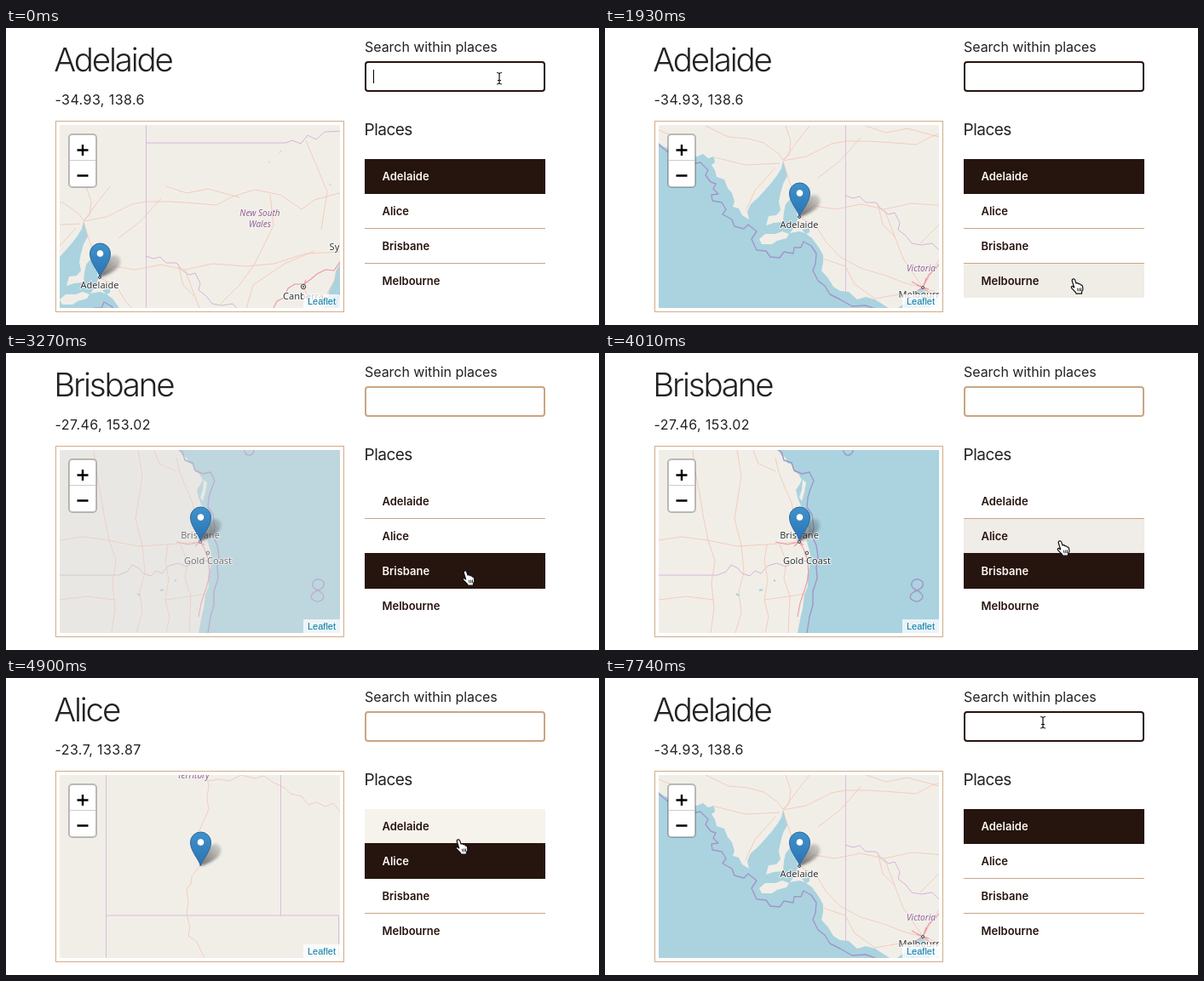
Recreate the animation shown at these times as an HTML page. Size 696 by 349 pixels, loop 8000 ms.

```html
<!DOCTYPE html>
<html lang="en">
<head>
<meta charset="utf-8">
<title>Places</title>
<style>
  html, body { margin: 0; width: 100%; height: 100%; overflow: hidden; background: #fff; }
  svg { display: block; width: 696px; height: 349px; }
  text { font-family: Inter, "Open Sans", sans-serif; fill: #222; }
  path, line { fill: none; }
  .title { font-size: 38.5px; font-weight: 300; letter-spacing: -2.2px; }
  .body { font-size: 16px; letter-spacing: -.05px; }
  .coords { font-size: 16px; letter-spacing: .42px; }
  .sub { font-size: 19px; letter-spacing: -.5px; }
  .row { font-size: 13px; font-weight: 600; }
  .sea { fill: #aad3df; }
  .land { fill: #f1eee8; }
  .road { stroke: #f4c4b2; stroke-width: .9; stroke-linejoin: round; opacity: .9; }
  .main { stroke: #ec97a5; stroke-width: 1.1; stroke-linejoin: round; }
  .edge { stroke: #c9a3cf; stroke-width: 1; opacity: .75; stroke-linejoin: round; }
  .faint { stroke: #d9bedb; stroke-width: 1; }
  .coast { stroke: #a295c8; stroke-width: 1.4; stroke-linejoin: round; }
  .town { font: 11px "Noto Sans", sans-serif; fill: #333; text-anchor: middle;
          stroke: #fff; stroke-opacity: .8; stroke-width: 2; paint-order: stroke; stroke-linejoin: round; }
  .state { font: italic 10px "Noto Sans", sans-serif; fill: #8c5f94; text-anchor: middle;
           stroke: #f7f3f0; stroke-width: 1.5; paint-order: stroke; }
  .dot { fill: #eee; stroke: #444; stroke-width: 1; }
  .link { font: 11px "Liberation Sans", Arial, sans-serif; fill: #0078a8; }
</style>
</head>
<body>
<svg viewBox="0 0 696 349">
  <defs>
    <clipPath id="view"><rect x="63" y="114" width="329" height="215"/></clipPath>
    <linearGradient id="blue" x1="0" y1="0" x2="0" y2="1">
      <stop offset="0" stop-color="#3f93cc"/><stop offset="1" stop-color="#2a72b4"/>
    </linearGradient>
    <linearGradient id="shade" x1="0" y1="1" x2="1" y2="0">
      <stop offset="0" stop-color="#222" stop-opacity=".65"/><stop offset="1" stop-color="#444" stop-opacity=".15"/>
    </linearGradient>
    <filter id="soft" x="-30%" y="-30%" width="160%" height="160%"><feGaussianBlur stdDeviation="1.5"/></filter>
  </defs>
  <rect width="696" height="349" fill="#fff"/>
  <text id="title" class="title" x="56.3" y="51"></text>
  <text id="coords" class="coords" x="57.5" y="90"></text>

  <rect x="58.5" y="109.5" width="338" height="224" fill="#fff" stroke="#cfac88"/>
  <g clip-path="url(#view)">
    <rect x="63" y="114" width="329" height="215" fill="#ddd"/>

    <g id="south">
      <rect class="land" x="0" y="0" width="720" height="480"/>
      <path class="sea" d="M40 126L62 133 70 139 82 142 92 140 99 148 108 150 115 147 121 152 128 150 129 157 125 160 129 166
        131 174 140 177 144 187 149 193 152 203 150 209 157 211 161 219 169 224 167 215 171 206 180 198 189 188 196 180 202 172 207 164 209 155
        211 162 214 173 209 182 206 193 204 203 206 213 201 219 192 220 189 231 198 228 209 227 210 215 212 206 217 200 221 205 225 213 226 224 222 233 217 240
        228 238 235 240 243 246 251 257 256 266 256 275 254 284 262 293 268 303 276 308 286 309 296 318 306 315 317 318 339 332 V480H40Z"/>
      <path class="sea" d="M339 332L353 321 364 316 369 322 378 323 384 330 392 327 399 332 405 340 410 337 408 329 418 321 430 310 442 304
        458 301 472 297 487 293 485 281 489 270 490 258 496 248 497 237 503 226 505 214 510 204 515 195 521 180 530 164 545 150 550 110 560 80H720V480H339Z"/>
      <path class="sea" d="M360 312L366 308 372 304 377 310 375 317 370 320 365 316Z"/>
      <path class="land" d="M181 247L188 241 200 241 208 238 216 241 213 246 202 249 196 253 184 253Z M348 355L354 358 354 368 350 373 346 366Z
        M437 357L444 362 449 370 446 376 440 370Z M448 379L454 381 451 385 445 383Z"/>
      <path class="land" d="M362 394L366 385 370 389 380 393 392 390 408 396 418 391 426 392 436 384 444 386 451 382 458 394 460 480H372Z"/>
      <path class="sea" d="M231 236L240 234 240 239 236 241Z"/>
      <path class="faint" d="M282.5 0V310"/>
      <path class="edge" d="M282 63H446L454 60 464 64 472 54 482 59 492 50 512 49"/>
      <path class="edge" d="M282 196L291 199 299 197 306 204 318 204 325 213 333 218 340 216 346 228 344 236 353 243 360 252 371 254
        384 252 394 262 408 258 421 262 432 261 438 270 447 271 487 294"/>
      <path class="road" d="M63 119L80 126 100 134 M118 114L145 127 168 129 186 134 203 146 209 154 216 148 218 132 212 114 M209 155L236 150 248 144 266 135
        282 132 310 132 340 134 365 136 384 126 410 118 440 124 465 141 480 130 520 119 M165 214L176 190 200 163 M129 151L165 160 205 158"/>
      <path class="road" d="M228 221L224 200 216 178 209 156 M228 221L245 208 270 212 300 206 328 212 360 205 400 208 432 205 470 193 516 191
        M228 221L248 232 259 250 276 268 300 281 330 290 350 298 373 304 M256 270L282 279 293 300 317 317 345 312"/>
      <path class="road" d="M250 175L276 155 300 128 M328 212L340 244 350 270 373 304 M370 252L392 230 410 205 432 160 428 124
        M306 114L330 122 355 117 392 127 M240 114L226 132 210 154"/>
      <path class="road" d="M373 304L390 275 400 258 M373 304L400 314 430 308 460 299 485 282 490 250 503 225 516 191 M467 232L478 255 486 280
        M320 205L326 230 340 244 M400 258L408 230 445 205 480 190 M470 60L495 120 488 165"/>
      <path class="main" d="M373 304L380 289 387 283 396 272 409 268 418 264 431 259 436 249 444 245 449 234 457 229 468 229 476 223 483 217 493 212 503 213 516 194
        M467 232L470 224 M373 304L361 311 M373 304L383 312 400 315 M373 304L360 297 M373 304L377 293 M366 301L380 306"/>
      <path class="coast" d="M40 118L64 137 74 145 85 148 100 159 112 157 121 166 118 172 124 180 130 182 127 188 133 194 125 195 126 202 137 204 142 212
        138 218 149 224 152 232 163 235 168 230 178 238 172 247 178 260 189 261 194 268 205 269 210 262 221 264 222 257 230 257 233 250 242 255 248 264
        247 276 244 284 250 296 258 302 264 312 276 318 290 326 306 325 317 329 332 341 350 335 361 328 375 335 379 329 387 332 391 341 407 348 424 324 445 314"/>
      <path class="coast" d="M445 314L470 309 490 305 502 290 497 282 504 264 507 245 517 230 520 214 530 198 545 186
        M345 350Q354 347 361 352L366 371Q361 382 352 384L348 371 341 362Z M367 397L364 382 378 376 384 383 400 386 412 382 420 371
        416 358 426 344 437 342 447 350 461 367 463 382 457 392 464 403"/>
      <circle class="dot" cx="228" cy="221" r="1.5"/><circle class="dot" cx="373" cy="304" r="1.5"/>
      <circle class="dot" cx="467" cy="232" r="2.7"/><circle cx="467" cy="232" r="1" fill="#444"/>
      <path d="M439 75l2-3M426 86l2-1M497 111l3 2" stroke="#b9cfe0"/>
      <text class="state" x="416" y="149">New South</text><text class="state" x="416" y="162">Wales</text>
      <text class="state" x="371" y="285">Victoria</text>
      <text class="town" x="228" y="234">Adelaide</text>
      <text class="town" x="373" y="316">Melbourne</text>
      <text class="town" x="467" y="247">Canberra</text>
      <text class="town" x="516" y="189">Sydney</text>
      <rect id="strip" x="0" y="397" width="720" height="90" fill="#d8dadb"/>
    </g>

    <g id="east">
      <rect class="sea" x="63" y="114" width="329" height="215"/>
      <path class="land" d="M63 114H203L207 120 212 123 214 129 219 131 222 139 227 142 231 149 228 155 224 161 226 170 230 180 231 190 229 197 235 207 237 222 241 236 240 252
        237 262 238 274 234 284 232 300 229 313 226 329H63Z M232 149L236 152 234 164 231 174 228 170 231 160Z M236 202L239 206 238 215 235 209Z"/>
      <path class="edge" d="M63 261H132L142 257 148 249 156 253 161 259 170 262 176 256 183 259 191 250 202 247 212 251 222 246 240 244"/>
      <path class="road" d="M103 114L106 140 111 165 115 190 121 220 129 244 125 270 128 300 124 329 M63 220L90 216 120 220 155 227 190 225 228 222
        M155 114L160 145 156 170 152 195 160 226 M200 123L204 140 211 158 219 176 223 196 228 222 M174 114L180 130 200 139"/>
      <path class="road" d="M190 225L187 245 191 266 187 290 192 310 188 329 M160 226L163 258 157 280 160 305 153 329 M187 290L236 283
        M205 225L213 246 210 265 217 285 215 329 M63 290L95 286 128 290"/>
      <path class="main" d="M228 222L214 225 200 222 M228 206V222L233 230 238 244 239 262 235 276 229 294 226 310 M222 216L233 226M222 227L232 218"/>
      <path class="coast" d="M196 110L207 116 210 126 219 129 222 138 231 142 240 140 245 150 241 160 238 170 237 181 243 190 245 205 243 215 248 226 250 240
        248 251 249 265 244 280 244 296 240 310 237 329 M279 110Q280 121 286 120 Q292 119 291 110 M366 279Q357 275 361 268 Q367 263 373 269
        Q375 276 366 279 Q356 283 359 289 Q366 295 372 289 Q375 283 366 279Z"/>
      <path d="M181 279l4-1M154 283l3 2M198 267l2 1" stroke="#a4cfdf" stroke-width="2"/>
      <circle class="dot" cx="228" cy="222" r="1.5"/><circle class="dot" cx="237" cy="235" r="1.8"/>
      <text class="town" x="228" y="218">Brisbane</text>
      <text class="town" x="237" y="248">Gold Coast</text>
    </g>

    <g id="centre">
      <rect class="land" x="63" y="114" width="329" height="215"/>
      <path class="faint" d="M117.5 114V329M322.5 114V279M117 279H390.5V329"/>
      <path class="road" d="M235 114L238 126 236 142 238 154 233 166 228 177 221 188 226 204 228 220 218 233 217 242 212 248 214 264 212 278 216 293
        214 303 224 310 228 319 233 329 M237 121L250 119 262 121 276 114 292 118 303 115 314 123 327 129 334 136 347 139 355 149 365 146 375 151 384 147 392 157"/>
      <text class="state" x="220" y="118">Territory</text>
    </g>

    <g id="pin">
      <path d="M0 0Q3-18 13-25Q23-29 24-18Q22-7 0 0Z" style="fill:url(#shade)" filter="url(#soft)"/>
      <path d="M0 0C-2-8-12-17-12-28A12 12 0 0 1 12-28C12-17 2-8 0 0Z" style="fill:url(#blue)" stroke="#2d699b"/>
      <circle cy="-28" r="4.3" fill="#fff" stroke="#3277ae" stroke-width=".8"/>
    </g>

    <rect x="74" y="125" width="32" height="62" rx="4" fill="#fff" stroke="#000" stroke-opacity=".25" stroke-width="2"/>
    <path d="M75 155.5H105" stroke="#ccc"/>
    <path d="M83.5 143.5H96.5M90 137V150M83.5 173.5H96.5" stroke="#000" stroke-width="2.4"/>
    <rect x="349" y="313" width="43" height="16" fill="#fff" fill-opacity=".75"/>
    <text class="link" x="354" y="325">Leaflet</text>
  </g>

  <text class="body" x="421" y="28">Search within places</text>
  <rect id="box" x="422" y="40" width="210" height="34" rx="3" fill="#fff" stroke-width="2"/>
  <rect id="caret" x="431" y="49" width="1" height="16" fill="#000"/>
  <text class="sub" x="420.5" y="126">Places</text>
  <g id="list"></g>

  <g id="cursor" stroke-linejoin="round">
    <path id="beam" d="M-3-6.5Q-.3-6.5 0-5Q.3-6.5 3-6.5M0-5V5.5M-3 7Q-.3 7 0 5.5Q.3 7 3 7M-2 2.5H2" stroke="#111" stroke-width="1.2"/>
    <path id="arrow" d="M-4-8V5.5L-1 2.8 1 7.5 3.2 6.5 1.2 2H5.2Z" style="fill:#000" stroke="#fff"/>
    <g id="hand" transform="scale(1.1)">
      <path d="M-4.6-7.2Q-2.6-8-2-6L-.9-2.7Q.8-3.5 1.6-2Q3.2-2.6 3.8-1Q5.6-1.2 5.9.6L6.3 3.6 5 6.6V8.3H-.8L-1.5 6.8-5.6 2.6Q-6.7.9-5 .4L-3 1.7-5.3-5.4Q-5.5-6.8-4.6-7.2Z"
        style="fill:#fff" stroke="#111" stroke-width="1.1"/>
      <path d="M.3 2.5L1 5.8M2.3 2.3L2.7 5.8M4.1 2.2V5.6" stroke="#111" stroke-width=".8"/>
    </g>
  </g>
</svg>
<script>
  const LOOP = 8000, DARK = '#26140e', TAN = '#c9a583';
  const $ = id => document.getElementById(id);
  const set = (el, attrs) => { for (const k in attrs) el.setAttribute(k, attrs[k]); };
  const show = (el, on) => set(el, { visibility: on ? 'visible' : 'hidden' });
  const make = (tag, attrs, parent) => {
    const el = document.createElementNS('http://www.w3.org/2000/svg', tag);
    set(el, attrs);
    return parent.appendChild(el);
  };
  // Latest entry of a [time, ...values] track
  const at = (track, t) => track.filter(e => e[0] <= t).pop().slice(1);

  const places = [
    { name: 'Adelaide', coords: '-34.93, 138.6', map: 'south', x: 0, y: 0 },
    { name: 'Alice', coords: '-23.7, 133.87', map: 'centre', x: 0, y: 0 },
    { name: 'Brisbane', coords: '-27.46, 153.02', map: 'east', x: 0, y: 0 },
    { name: 'Melbourne', coords: '-37.81, 144.96', map: 'south', x: -145, y: -83 }
  ];
  const chosen = [[0, 0], [2080, 3], [3270, 2], [4310, 1], [5650, 0]];
  // A panned map settles one pixel lower than a freshly loaded one
  const pan = [[0, -118, 72], [150, 0, 1], [2080, 72, 41], [2230, 0, 1], [3270, 0, 0]];
  const fade = [[0, 1], [3270, .6], [3420, 1], [4310, .6], [4460, 1], [5650, .6], [5800, 1]];
  const focus = [[0, 1], [2080, 0], [7290, 1]];
  const blink = [[0, 1], [450, 0], [1040, 1], [1640, 0], [7290, 1], [7740, 0]];
  const hover = [[0, -1], [1790, 2, '#f0ede6'], [1930, 3, '#f0ede6'], [2080, -1],
    [3860, 1, '#f6f3ec'], [4010, 1, '#f0ece7'], [4310, -1], [4900, 0, '#f6f3ec'], [5650, -1]];
  const pointer = [
    [0, 579, 59, 'beam'], [1340, 577, 70, 'beam'], [1490, 573, 108, 'arrow'], [1640, 566, 180, 'hand'],
    [1790, 558, 258, 'hand'], [1930, 554, 303, 'hand'],
    [2530, 553, 300, 'hand'], [2680, 551, 293, 'hand'], [2820, 548, 286, 'hand'], [3270, 543, 264, 'hand'],
    [3710, 542, 257, 'hand'], [3860, 540, 241, 'hand'], [4010, 538, 229, 'hand'],
    [4750, 537, 214, 'hand'], [4900, 535, 198, 'hand'], [5650, 536, 198, 'hand'],
    [6400, 535, 185, 'hand'], [6550, 531, 150, 'arrow'], [6700, 526, 112, 'arrow'],
    [6840, 519, 72, 'beam'], [6990, 514, 52, 'beam']
  ];

  const list = $('list');
  const rowTop = i => 153 + 41 * i;
  const glow = make('rect', { x: 421, width: 212, height: 40 }, list);
  for (let i = 1; i < 4; i++) make('rect', { x: 421, y: rowTop(i), width: 212, height: 1, fill: TAN }, list);
  const bar = make('rect', { x: 421, width: 212, fill: DARK }, list);
  const labels = places.map((p, i) => {
    const el = make('text', { class: 'row', x: 441.5, y: 179 + 41 * i }, list);
    el.textContent = p.name;
    return el;
  });

  function render(t) {
    const [pick] = at(chosen, t), place = places[pick];
    const [px, py] = at(pan, t), [alpha] = at(fade, t);
    $('title').textContent = place.name;
    $('coords').textContent = place.coords;
    for (const id of ['south', 'east', 'centre']) {
      show($(id), id === place.map);
      set($(id), { opacity: alpha });
    }
    set($('south'), { transform: `translate(${place.x + px} ${place.y + py})` });
    set($('pin'), { transform: `translate(${228.5 + px} ${221 + py})` });
    show($('strip'), place.map === 'south' && t >= 2080 && t < 2380);

    const [focused] = at(focus, t);
    set($('box'), { stroke: focused ? DARK : TAN });
    show($('caret'), focused && at(blink, t)[0]);

    const [over, tint] = at(hover, t);
    show(glow, over >= 0);
    if (over >= 0) set(glow, { y: rowTop(over) + 1, fill: tint });
    const top = Math.max(154, rowTop(pick));
    set(bar, { y: top, height: (pick === 3 ? 317 : rowTop(pick + 1) + 1) - top });
    labels.forEach((el, i) => { el.style.fill = i === pick ? '#fbf7f2' : DARK; });

    const [x, y, kind] = at(pointer, t);
    set($('cursor'), { transform: `translate(${x} ${y})` });
    for (const id of ['beam', 'arrow', 'hand']) show($(id), id === kind);
  }

  const start = performance.now();
  function tick() {
    render((performance.now() - start) % LOOP);
    requestAnimationFrame(tick);
  }
  tick();
</script>
</body>
</html>
```
